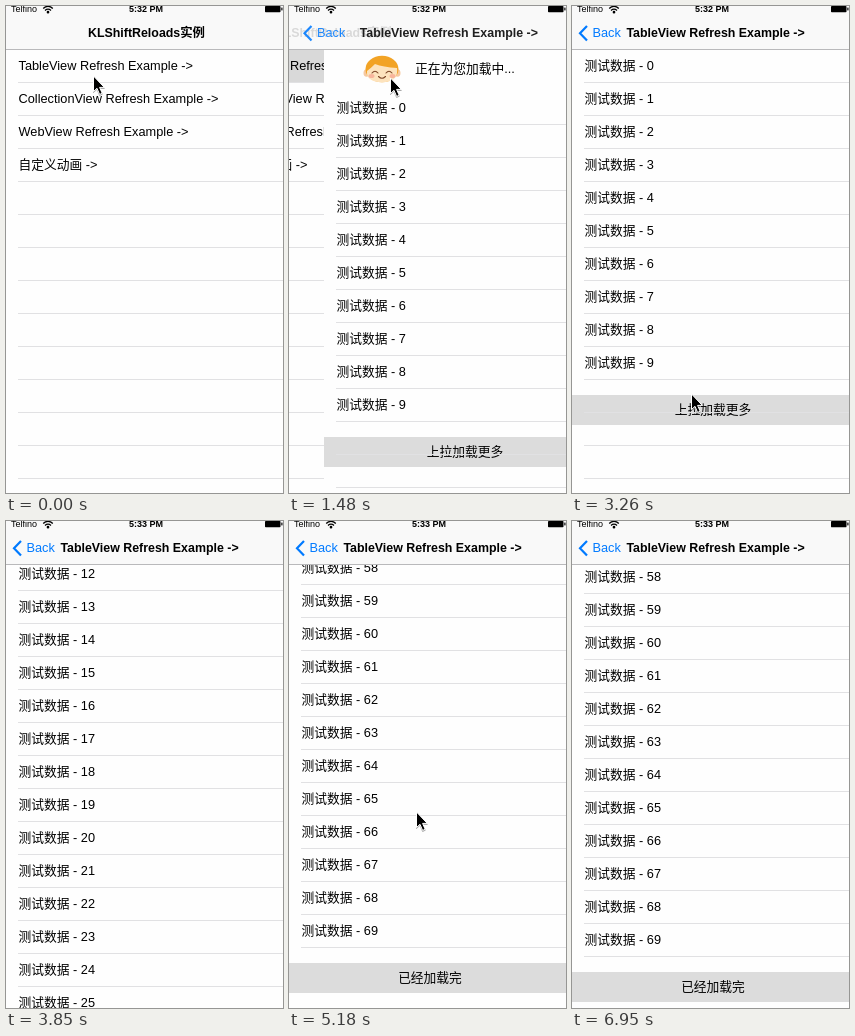
An HTML page that plays this animation: 277x487 px, repeating every 7.77 s.

```html
<!DOCTYPE html>
<html lang="zh-CN">
<head>
<meta charset="utf-8">
<title>Refresh demo</title>
<style>
  html, body { margin: 0; width: 100%; height: 100%; overflow: hidden; background: #fefefe; }
  #stage {
    position: relative; width: 277px; height: 487px; overflow: hidden; background: #fefefe; color: #000;
    font: 300 12.75px/32px "Liberation Sans", "Noto Sans CJK SC", "Noto Sans CJK", sans-serif;
    white-space: nowrap;
  }
  #stage div, #stage svg, #stage ul, #stage b, #stage span { position: absolute; }
  .page { left: 0; top: 0; width: 277px; height: 487px; overflow: hidden; background: #fefefe; }
  ul { left: 0; top: 0; width: 277px; margin: 0; padding: 0; list-style: none; }
  li { height: 32px; margin-left: 12px; padding-left: .5px; border-bottom: 1px solid #e1e1e3; }
  li.on { background: #d9d9d9; box-shadow: -12px 0 #d9d9d9; }
  .short li:nth-child(n + 11) { color: transparent; }
  #home ul { top: 44px; }
  #head { left: 0; top: 0; width: 277px; height: 32px; }
  #head span { left: 91px; }
  #face { left: 39px; top: 2px; transform-origin: 50% 100%; }
  #foot { left: 0; top: 0; width: 277px; height: 30px; line-height: 30px; background: #dcdcdc; }
  #foot span { left: 141px; transform: translateX(-50%); }
  #nav { left: 0; top: 0; width: 277px; height: 43px; background: #f9f9f9; border-bottom: 1px solid #b9b9bb; }
  #nav b { top: 11px; font-size: 12.4px; font-weight: 700; }
  #back { left: 0; top: 11px; color: #007aff; }
  #back span { left: 20.5px; }
  #status { left: 0; top: -3px; font-size: 9px; line-height: 12px; }
  #nav #clock { left: 123px; top: 0; font-size: 9px; }
  #cursor { left: -2px; top: -2px; filter: drop-shadow(.6px 1px .7px rgba(0, 0, 0, .35)); }
</style>
</head>
<body>
<div id="stage">
  <div class="page" id="home"><ul></ul></div>
  <div class="page" id="table">
    <div id="head">
      <svg id="face" width="38" height="28" viewBox="0 0 38 28">
        <ellipse cx="3.5" cy="18" rx="3" ry="3.8" fill="#f6c9a0"/>
        <ellipse cx="34.5" cy="18" rx="3" ry="3.8" fill="#f6c9a0"/>
        <ellipse cx="19" cy="14" rx="16.5" ry="13.2" fill="#f2a325"/>
        <path d="M4 16Q8 13 12 9Q20 12 34 13Q36 27 19 27.3Q3 27 4 16Z" fill="#fde3bd"/>
        <ellipse cx="8.5" cy="21" rx="3" ry="2" fill="#f8b59c"/>
        <ellipse cx="29.5" cy="21" rx="3" ry="2" fill="#f8b59c"/>
        <path d="M9 18Q12 14.5 15 18M23 18Q26 14.5 29 18M15.5 21.5Q19 25 22.5 21.5" fill="none" stroke="#7c4526" stroke-width="1.1" stroke-linecap="round"/>
      </svg>
      <span>正在为您加载中...</span>
    </div>
    <div id="foot"><span></span></div>
    <ul></ul>
  </div>
  <div id="nav">
    <b id="homeTitle">KLShiftReloads实例</b>
    <b id="tableTitle">TableView Refresh Example -&gt;</b>
    <div id="back">
      <svg width="18" height="32" fill="none" stroke="#007aff" stroke-width="2.2"><path d="M15 9L8 16.3L15 23.6"/></svg>
      <span>Back</span>
    </div>
    <div id="status">
      <span style="left:5px">Telfino</span>
      <svg style="left:36px;top:1px" width="12" height="10" fill="none" stroke="#000" stroke-width="1.3">
        <path d="M1.2 4.4Q6 .2 10.8 4.4M3 6.4Q6 3.8 9 6.4"/><circle cx="6" cy="8.2" r=".7" fill="#000"/>
      </svg>
      <b id="clock"></b>
      <svg style="left:259px;top:3px" width="18" height="7"><rect width="15.5" height="6.3" rx=".8"/><rect x="16.3" y="1.6" width="1.2" height="2.8"/></svg>
    </div>
  </div>
  <svg id="cursor" width="14" height="22" viewBox="0 0 14 22">
    <path d="M1.5 1V16.5L5 13.3L7.6 19.4L10.2 18.3L7.6 12.4H12.3Z" fill="#000" stroke="#fff" stroke-width="1" stroke-linejoin="round"/>
  </svg>
</div>
<script>
  // The picture advances in even steps; all moves below are timed in steps.
  const LOOP = 7770, STEP = 148.1, ROW = 33;
  const PUSH = 8, RELEASE = 22, FLICK_END = 30, SETTLED = 37;
  const $ = id => document.getElementById(id);
  const ramp = (n, a, b) => Math.min(1, Math.max(0, (n - a) / (b - a)));
  const easeOut = u => 1 - (1 - u) ** 3;

  // Pointer legs: start step, end step, destination.
  const home = [88, 71];
  const legs = [
    [2, 4, 102, 73], [13, 15, 112, 292], [15, 20, 110, 345], [21, 25, 150, 520],
    [27, 30, 170, 129], [30, 35, 128, 292], [37, 45, 258, 473], [46, 47, 290, 500]
  ];

  function pointer(n) {
    return legs.reduce(([x, y], [a, b, tx, ty]) => {
      const u = ramp(n, a, b);
      return [x + (tx - x) * u, y + (ty - y) * u];
    }, home);
  }

  // Centre of the first row: header closes, the list speeds up, then bounces at its end.
  function scroll(n) {
    if (n < RELEASE) return 102;
    if (n < FLICK_END) return 60 - 403 * ((n - RELEASE) / 4) ** 2.12;
    const m = Math.min(n, SETTLED) - FLICK_END;
    return -1858 + 167 * Math.exp(-.579 * m) * Math.cos(1.5 * Math.PI * m / 7);
  }

  function fill(list, count, label) {
    for (let i = 0; i < count; i++) {
      const li = document.createElement('li');
      li.textContent = label(i);
      list.append(li);
    }
  }

  function move(el, x, y, extra = '') {
    el.style.transform = `translate(${x}px, ${y}px) ${extra}`;
  }

  const menu = ['TableView', 'CollectionView', 'WebView'].map(s => s + ' Refresh Example ->');
  menu.push('自定义动画 ->');
  const homeList = document.querySelector('#home ul');
  const list = document.querySelector('#table ul');
  const footText = document.querySelector('#foot span');
  fill(homeList, 14, i => menu[i] || '');
  fill(list, 70, i => '测试数据 - ' + i);

  function draw(n) {
    const p = easeOut(ramp(n, PUSH, PUSH + 4));
    const [x, y] = pointer(n);
    const top = Math.round(scroll(n));
    const loaded = n > RELEASE;
    const count = loaded ? 70 : 10;

    homeList.firstChild.className = n >= PUSH ? 'on' : '';
    move($('home'), Math.round(-84 * p), 0);
    move($('table'), Math.round(277 * (1 - p)), 0);
    move($('homeTitle'), 140.5 - 110 * p, 0, 'translateX(-50%)');
    move($('tableTitle'), 143.5 + 130 * (1 - p), 0, 'translateX(-50%)');
    move($('back'), 60 * (1 - p), 0);
    $('homeTitle').style.opacity = 1 - p;
    $('tableTitle').style.opacity = $('back').style.opacity = p;

    list.className = loaded ? '' : 'short';
    move(list, 0, top - 16);
    move($('head'), 0, top - 55);
    move($('foot'), 0, top + (count - 1) * ROW + 32);
    footText.textContent = n > FLICK_END ? '已经加载完' : '上拉加载更多';
    $('face').style.transform = n >= 14 && n % 2 === 0 ? 'scale(1.03, .92)' : 'none';

    $('clock').textContent = loaded ? '5:33 PM' : '5:32 PM';
    move($('cursor'), Math.round(x), Math.round(y));
  }

  const start = performance.now();
  let shown = -1;
  function tick() {
    const t = (performance.now() - start) % LOOP;
    const n = Math.floor((t + 12) / STEP);
    if (n !== shown) draw(shown = n);
    requestAnimationFrame(tick);
  }
  tick();
</script>
</body>
</html>
```
